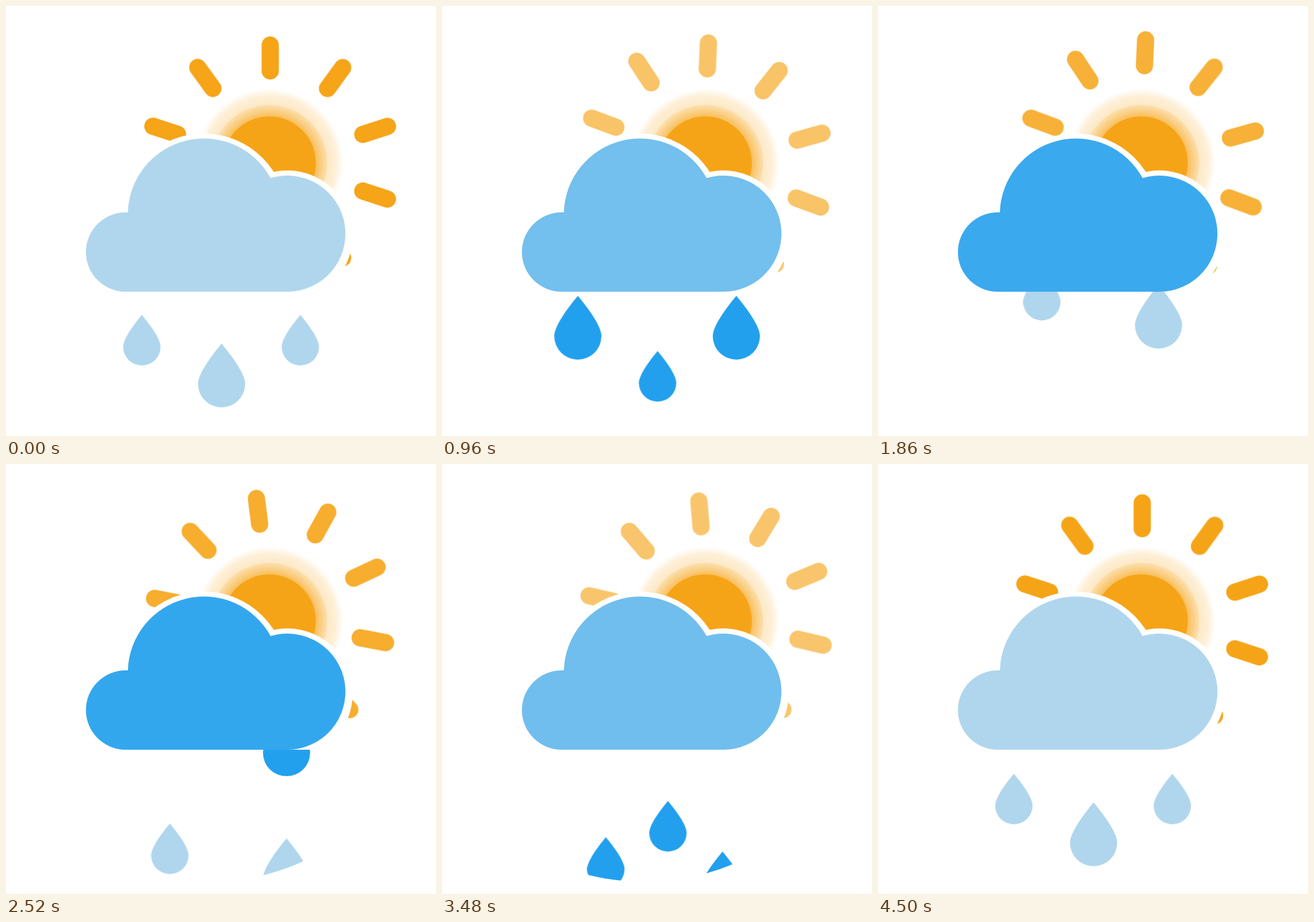
An HTML page that plays this animation: 748x748 px, repeating every 4.53 s.

```html
<!DOCTYPE html>
<html lang="en">
<head>
<meta charset="utf-8">
<title>Sun and showers</title>
<style>
  :root { --light: #b0d6ed; --blue: #22a0ee; --sun: #f6a417; --loop: 4530ms linear infinite; }
  html, body { margin: 0; width: 100%; height: 100%; overflow: hidden; background: #fff; }
  svg { display: block; width: 100%; height: 100%; }

  .rays {
    stroke: var(--sun); stroke-width: 30; stroke-linecap: round;
    transform-origin: 459.5px 272.3px;
    animation: spin var(--loop), pulse var(--loop);
  }
  .cloud { fill: var(--light); animation: tint var(--loop); }
  .drops use { animation: fall var(--loop); }
  .light { fill: var(--light); }
  .blue { fill: var(--blue); }

  @keyframes spin { to { transform: rotate(181.2deg); } }
  @keyframes fall { to { transform: translateY(1141.5px); } }
  @keyframes pulse {
    0%, 49.67%, 99.34%, 100% { opacity: 1; }
    24.83%, 74.5% { opacity: .6; }
  }
  @keyframes tint {
    0%, 99.34%, 100% { fill: var(--light); }
    49.67% { fill: var(--blue); }
  }
</style>
</head>
<body>
<svg viewBox="0 0 748 748">
  <defs>
    <path id="big" d="M0 0C16 19 41 52 41 70A41 41 0 0 1 -41 70C-41 52 -16 19 0 0Z"/>
    <path id="small" transform="scale(.793)" d="M0 0C16 19 41 52 41 70A41 41 0 0 1 -41 70C-41 52 -16 19 0 0Z"/>
    <path id="ray" d="M459.5 68V113"/>
    <clipPath id="rain"><path d="M-10 497H714A400 400 0 0 1 -10 497Z"/></clipPath>
    <radialGradient id="outer" gradientUnits="userSpaceOnUse" cx="458" cy="273" r="129">
      <stop offset=".775" stop-color="#f6a417" stop-opacity=".25"/>
      <stop offset=".9" stop-color="#f6a417" stop-opacity=".17"/>
      <stop offset="1" stop-color="#f6a417" stop-opacity="0"/>
    </radialGradient>
    <radialGradient id="inner" gradientUnits="userSpaceOnUse" cx="458" cy="273" r="101">
      <stop offset=".8" stop-color="#f6a417" stop-opacity=".6"/>
      <stop offset="1" stop-color="#f6a417" stop-opacity=".12"/>
    </radialGradient>
  </defs>

  <!-- rays sit on a slightly wide ellipse -->
  <g class="rays">
    <use href="#ray"/>
    <use href="#ray" transform="translate(5.9) rotate(36 459.5 272.5)"/>
    <use href="#ray" transform="translate(9.5) rotate(72 459.5 272.5)"/>
    <use href="#ray" transform="translate(9.5) rotate(108 459.5 272.5)"/>
    <use href="#ray" transform="translate(5.9) rotate(144 459.5 272.5)"/>
    <use href="#ray" transform="rotate(180 459.5 272.5)"/>
    <use href="#ray" transform="translate(-5.9) rotate(216 459.5 272.5)"/>
    <use href="#ray" transform="translate(-9.5) rotate(252 459.5 272.5)"/>
    <use href="#ray" transform="translate(-9.5) rotate(288 459.5 272.5)"/>
    <use href="#ray" transform="translate(-5.9) rotate(324 459.5 272.5)"/>
  </g>

  <circle cx="458" cy="273" r="129" fill="url(#outer)"/>
  <circle cx="458" cy="273" r="101" fill="url(#inner)"/>
  <circle cx="458" cy="273" r="81" fill="#f6a417"/>

  <!-- white rim behind the cloud -->
  <g fill="#fff">
    <circle cx="344" cy="366" r="144.3"/>
    <circle cx="489.5" cy="399.5" r="113.5"/>
    <path d="M207 366H489V513H207Z"/>
  </g>

  <g class="drops" clip-path="url(#rain)">
    <g class="light">
      <use href="#small" x="236.3" y="537"/>
      <use href="#big" x="375" y="587"/>
      <use href="#small" x="512" y="537"/>
      <use href="#small" x="285" y="-10"/>
      <use href="#big" x="488" y="16"/>
      <use href="#small" x="236.3" y="-595.5"/>
      <use href="#big" x="375" y="-545.5"/>
      <use href="#small" x="512" y="-595.5"/>
    </g>
    <g class="blue">
      <use href="#big" x="236.3" y="262"/>
      <use href="#small" x="375" y="358"/>
      <use href="#big" x="512" y="262"/>
      <use href="#small" x="285" y="-228"/>
      <use href="#small" x="393" y="-291"/>
      <use href="#big" x="488" y="-203"/>
    </g>
  </g>

  <path class="cloud" d="M208 497A69 69 0 0 1 208 359H212A132.3 132.3 0 0 1 460.3 299.3A101 101 0 1 1 489.5 497Z"/>
</svg>
</body>
</html>
```
